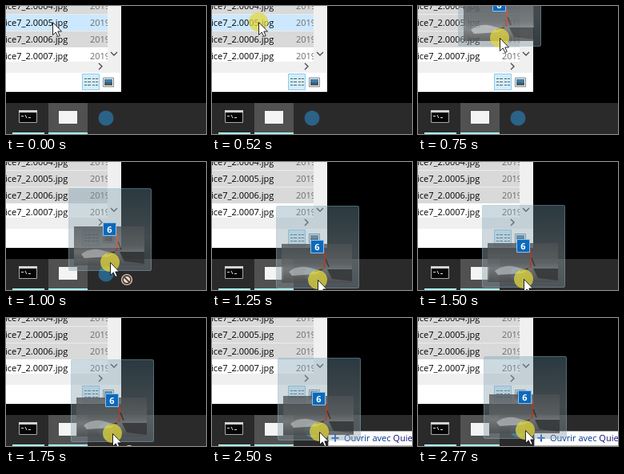
Recreate the animation shown at these times as an HTML page. Size 250 px wide and 161 px high, loop 3.54 s.

```html
<!DOCTYPE html>
<html lang="fr">
<head>
<meta charset="utf-8">
<title>Drag files to the taskbar</title>
<style>
  html, body { margin: 0; width: 100%; height: 100%; overflow: hidden; background: #000; }
  svg { display: block; width: 250px; height: 161px; }
  text { font-family: "Open Sans", "Noto Sans", sans-serif; font-size: 11px; }

  .pointer, .halo, .drag, .hover, .denied, .tip { animation: 3540ms step-end infinite; }
  .pointer { animation-name: move; }
  .halo { animation-name: press; }
  .drag { animation-name: carry; }
  .hover { animation-name: unhover; }
  .denied { animation-name: deny; }
  .tip { animation-name: offer; }

  @keyframes move {
    0% { transform: translate(58px, 20px); }
    21.18% { transform: translate(102px, 40px); }
    28.24% { transform: translate(130px, 126px); }
    35.31% { transform: translate(132px, 148px); }
    42.37% { transform: translate(132px, 147px); }
    49.43% { transform: translate(133px, 145px); }
    70.62% { transform: translate(134px, 143px); }
    78.24%, 100% { transform: translate(134px, 141px); }
  }
  @keyframes press { 0% { opacity: 0; } 14.68%, 100% { opacity: 1; } }
  @keyframes carry { 0% { opacity: 0; } 21.18%, 100% { opacity: 1; } }
  @keyframes unhover { 0% { opacity: 1; } 21.18%, 100% { opacity: 0; } }
  @keyframes deny { 0% { opacity: 0; } 28.24% { opacity: 1; } 70.62%, 100% { opacity: 0; } }
  @keyframes offer { 0% { opacity: 0; } 70.62%, 100% { opacity: 1; } }
</style>
</head>
<body>
<svg viewBox="0 0 250 161">
  <defs>
    <linearGradient id="glass" x2="0" y2="1">
      <stop offset="0" stop-color="#739aae" stop-opacity=".37"/>
      <stop offset=".6" stop-color="#98a9b0" stop-opacity=".44"/>
      <stop offset="1" stop-color="#8095a0" stop-opacity=".4"/>
    </linearGradient>
    <linearGradient id="room" x2="0" y2="1">
      <stop offset="0" stop-color="#4c5154"/>
      <stop offset=".5" stop-color="#5f6365"/>
      <stop offset=".65" stop-color="#77797a"/>
      <stop offset="1" stop-color="#4c4d4e"/>
    </linearGradient>
    <clipPath id="list"><path d="M0 0H127V73H0z"/></clipPath>
  </defs>

  <!-- file window -->
  <path fill="#fff" d="M0 0H144V108H0z"/>
  <path fill="#f0f0f0" d="M127 0H144V84H0V70H127z"/>
  <g clip-path="url(#list)">
    <path fill="#d9d9d9" d="M0 0H127V52H0z"/>
    <path class="hover" fill="#cce8ff" d="M0 11H127V31H0z"/>
    <path stroke="#ececec" d="M0 10.5H127M0 31.5H127"/>
    <g id="rows"></g>
  </g>
  <g fill="none" stroke="#505050" stroke-width="1.4">
    <path d="M131 58l4 4 4-4M116 72l4 4-4 4"/>
  </g>
  <path fill="#d3edfb" stroke="#8ccdf0" d="M95.5 85.5H116.5V105.5H95.5z"/>
  <path stroke="#54646e" stroke-dasharray="3 1 4 2 3 1 4" d="M98 91.5H115M98 95.5H115M98 99.5H115"/>
  <path fill="#fff" stroke="#7c8a94" d="M121.5 90.5H134.500V101.500H121.500z"/>
  <path fill="#3f7fb0" d="M123 92H133V96H123z"/>
  <path fill="#4d5a60" d="M123 96H133V100H123z"/>

  <!-- taskbar -->
  <path fill="#2b2a2a" d="M0 122H250V161H0z"/>
  <path fill="#525151" d="M53 122H102V161H53z"/>
  <path fill="#abeeee" d="M8 159H48V161H8zM53 159H102V161H53z"/>
  <path fill="#050505" stroke="#a9a9a9" d="M16.5 131.5H38.5V146.5H16.5z"/>
  <path fill="#d4d4d4" d="M16 131H39V134H16z"/>
  <path stroke="#ddd" fill="none" d="M19 138.5H22M24 137l2 4M28 140.5H31"/>
  <path fill="#f4f4f4" d="M66 132H89V148H66z"/>
  <circle cx="125" cy="141" r="9.5" fill="#2b6288"/>

  <!-- drop label -->
  <g class="tip">
    <path fill="#fff" stroke="#b5b5b5" d="M145.5 142.5H252V160.5H145.5z"/>
    <path stroke="#1f62c4" stroke-width="2" d="M149.500 151H158.500M154 146.500V155.500"/>
    <text x="165" y="155" fill="#003399">Ouvrir avec <tspan fill="#10107a">Quie</tspan></text>
  </g>

  <g class="pointer">
    <g class="drag">
      <g transform="translate(-52 -93)">
        <rect width="104" height="104" rx="2" fill="url(#glass)"/>
        <rect x=".5" y=".5" width="103" height="103" rx="2" fill="none" stroke="#9fd0dc" stroke-opacity=".3"/>
        <g opacity=".78">
          <path fill="url(#room)" d="M7 48H95V97H7z"/>
          <path fill="#343536" d="M64 80H95V95L70 92z"/>
          <path fill="#b4b5b5" d="M16 83q12-9 26-5l14 4-6 4-30 2z"/>
          <path fill="none" stroke="#b2432e" stroke-width="2.5" d="M59 54l3 13-2 12"/>
          <path fill="none" stroke="#352c2c" stroke-width="1.5" d="M62 67l4 10M58 80l-10 3"/>
        </g>
        <path fill="#0d69bb" stroke="#8fc3ea" d="M43.5 43.5H59.5V59.5H43.5z"/>
        <text x="51.5" y="55.5" fill="#fff" font-weight="700" text-anchor="middle">6</text>
      </g>
    </g>
    <circle class="halo" r="12" fill="#e4d83c" fill-opacity=".74"/>
    <g class="denied">
      <circle cx="21" cy="22" r="7" fill="#f3dccb"/>
      <path fill="none" stroke="#4e423c" stroke-width="1.8" d="M17.5 18.5l7 7M21 17a5 5 0 1 1-.01 0"/>
    </g>
    <path fill="#fff" stroke="#111" stroke-width=".9" d="M.5 .5V16.5L4.200 13L6.800 18.500L9.200 17.500L6.800 12H11.500z"/>
  </g>
</svg>
<script>
  const rows = document.getElementById("rows");
  const addText = (x, y, fill, label) => {
    const el = document.createElementNS("http://www.w3.org/2000/svg", "text");
    el.setAttribute("x", x);
    el.setAttribute("y", y);
    el.setAttribute("fill", fill);
    el.textContent = label;
    rows.append(el);
  };
  for (let i = 0; i < 4; i++) {
    const y = 4 + i * 21;
    addText(-1, y, "#000", `ice7_2.000${4 + i}.jpg`);
    addText(105, y, "#6d6d6d", "2019");
  }
</script>
</body>
</html>
```
